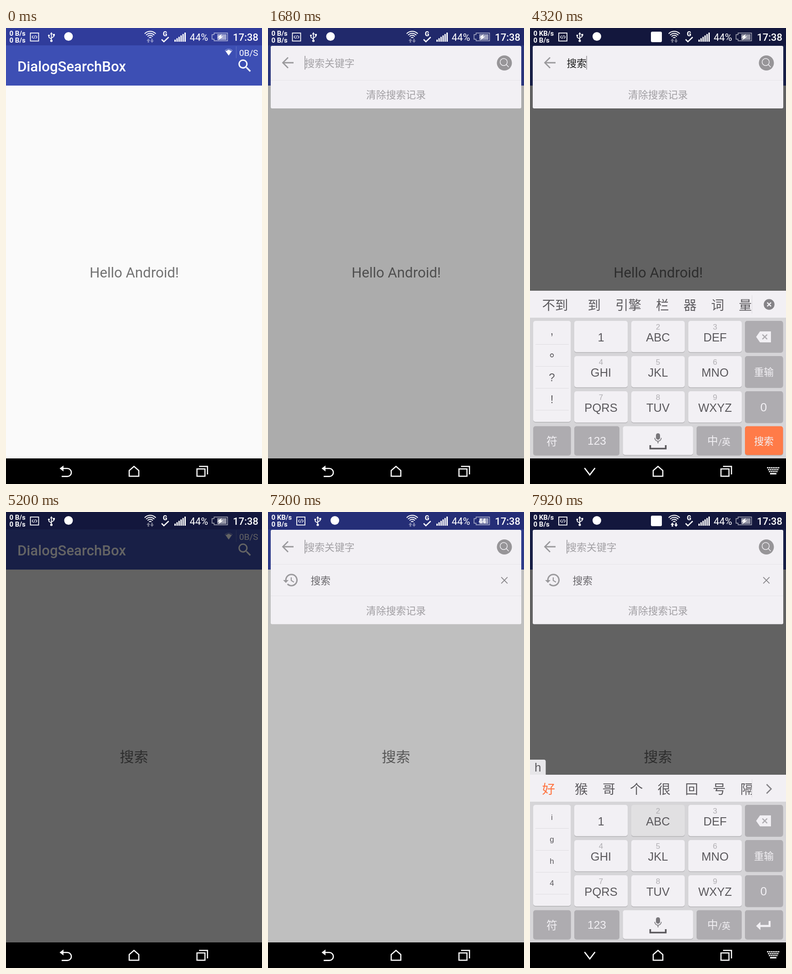
An HTML page with a canvas that plays this animation: 561 by 998 pixels, repeating every 8 s.

```html
<!DOCTYPE html>
<html lang="zh">
<head>
<meta charset="utf-8">
<title>DialogSearchBox</title>
<style>
html, body { margin: 0; width: 100%; height: 100%; overflow: hidden; background: #000; }
canvas { display: block; }
</style>
</head>
<body>
<canvas id="stage" width="561" height="998"></canvas>
<script>
const c = document.getElementById('stage').getContext('2d');
const LOOP = 8000, STEP = 80;
const SANS = 'Roboto, "Noto Sans CJK SC", "Noto Sans CJK", sans-serif';
const KEYS = '"Liberation Sans", "Noto Sans CJK SC", "Noto Sans CJK", sans-serif';
const PAPER = '#f2f0f4', GREY = '#9a999c', ICON = '#858387', KEY_GREY = '#aeacb0';

const SEARCH = new Path2D('M15.5 14h-.79l-.28-.27A6.471 6.471 0 0 0 16 9.5 6.5 6.5 0 1 0 9.5 16c1.61 0 3.09-.59 4.23-1.57l.27.28v.79l5 4.99L20.49 19l-4.99-5zm-6 0C7.01 14 5 11.99 5 9.5S7.01 5 9.5 5 14 7.01 14 9.5 11.99 14 9.5 14z');
const HISTORY = new Path2D('M13 3c-4.97 0-9 4.03-9 9H1l3.89 3.89.07.14L9 12H6c0-3.87 3.13-7 7-7s7 3.13 7 7-3.13 7-7 7c-1.93 0-3.68-.79-4.94-2.06l-1.42 1.42C8.27 19.99 10.51 21 13 21c4.97 0 9-4.03 9-9s-4.03-9-9-9zm-1 5v5l4.28 2.54.72-1.21-3.5-2.08V8H12z');

const PADS = ['1', 'ABC', 'DEF', 'GHI', 'JKL', 'MNO', 'PQRS', 'TUV', 'WXYZ'];

// time of each key press and the digit pressed
const PRESSES = [[2800, 7], [2960, 6], [3120, 8], [3280, 7], [3440, 8], [3600, 6], [7840, 4], [7920, 2]];

// from, spelling, candidates, left column
const COMPOSE = [
  [2800, 's', '是 去 请 上 说 前 却 确', 'sqp7'],
  [2960, 'so', '搜 破 颇 婆 泼 坡 魄 迫', 'srp7'],
  [3120, 'sou', '搜 艘 嗽 叟 飕 擞 嗖 馊', 'srp7'],
  [3280, "sou's", '搜索 搜 艘 嗽 叟 飕 擞', 'srp7'],
  [3440, "sou'su", '搜索 搜 艘 嗽 叟 飕 擞', 'srp7'],
  [3600, "sou'suo", '搜索 搜 艘 嗽 叟 飕 擞', 'srp7'],
  [7840, 'h', '好 猴 哥 个 很 回 号 隔', 'igh4']
];
const PREDICTED = '不到 到 引擎 栏 器 词 量';

const clamp = v => Math.max(0, Math.min(1, v));
const ramp = (t, from, span) => clamp((t - from) / span);
const within = (t, a, b) => t >= a && t < b;
const smooth = v => (1 - Math.cos(Math.PI * v)) / 2;

function text(s, x, y, size, color, align = 'left', weight = 400, family = SANS) {
  c.font = `${weight} ${size}px ${family}`;
  c.textAlign = align;
  c.fillStyle = color;
  c.fillText(s, x, y);
}
function rect(x, y, w, h, color) {
  c.fillStyle = color;
  c.fillRect(x, y, w, h);
}
function round(x, y, w, h, r, color) {
  c.beginPath();
  c.roundRect(x, y, w, h, r);
  c.fillStyle = color;
  c.fill();
}
function disc(x, y, r, color) {
  c.beginPath();
  c.arc(x, y, r, 0, 7);
  c.fillStyle = color;
  c.fill();
}
function trace(pts) {
  c.beginPath();
  for (let i = 0; i < pts.length; i += 2) c.lineTo(pts[i], pts[i + 1]);
}
function line(pts, color, width, closed) {
  trace(pts);
  if (closed) c.closePath();
  c.strokeStyle = color;
  c.lineWidth = width;
  c.stroke();
}
function poly(pts, color) {
  trace(pts);
  c.fillStyle = color;
  c.fill();
}
function cross(x, y, r, color, width) {
  line([x - r, y - r, x + r, y + r], color, width);
  line([x + r, y - r, x - r, y + r], color, width);
}
function icon(path, x, y, scale, color) {
  c.save();
  c.translate(x, y);
  c.scale(scale, scale);
  c.fillStyle = color;
  c.fill(path);
  c.restore();
}

function drawPage(t) {
  rect(0, 0, 561, 998, '#fafafa');
  rect(0, 0, 561, 126, '#3d4fb4');
  rect(0, 0, 561, 38, '#303c9b');
  text('DialogSearchBox', 25, 95, 31.17, '#fff', 'left', 500);
  for (const tap of [1440, 6960]) {
    if (within(t, tap, tap + 160)) disc(523, 82, 18 + (t - tap) / 10, 'rgba(255,255,255,.15)');
  }
  icon(SEARCH, 504.6, 64, 1.558, '#fff');
  c.beginPath();
  c.moveTo(488, 60);
  c.lineTo(480, 49);
  c.quadraticCurveTo(488, 43, 496, 49);
  c.closePath();
  c.strokeStyle = 'rgba(255,255,255,.6)';
  c.lineWidth = 1;
  c.stroke();
  poly([488, 60, 481.5, 50.5, 488, 47.5, 494.5, 50.5], '#fff');
  rect(504, 40, 1, 26, 'rgba(255,255,255,.2)');
  const busy = within(t, 2640, 2800);
  text(busy ? '0.2K/S' : '0B/S', 511, 61, 19, '#fff');
  if (t < 4720) text('Hello Android!', 281, 546, 31.17, '#737373', 'center');
  else text('搜索', 280.5, 547, 31.17, '#737373', 'center');
}

function drawStatus(t, keyboard) {
  const kb = within(t, 1840, 5040) || t >= 7040;
  const dx = kb ? 9.5 : 0, W = '#fff';
  text(kb ? '0 KB/s' : '0 B/s', 7.5, 16.5, 15, W, 'left', 700);
  text('0 B/s', 7.5, 31.5, 15, W, 'left', 700);

  c.save();
  c.translate(dx, 0);
  c.strokeStyle = W;
  c.lineWidth = 1.8;
  c.strokeRect(53.5, 11, 18, 17.5);
  line([60, 16.5, 57, 19.7, 60, 23], W, 1.2);
  line([65, 16.5, 68, 19.7, 65, 23], W, 1.2);
  line([63.6, 16, 61.4, 23.5], W, 1.1);
  line([99.5, 12, 99.5, 27], W, 1.8);
  poly([96.5, 14, 99.5, 9, 102.5, 14], W);
  line([99.5, 24, 94, 20.5, 94, 17], W, 1.6);
  line([99.5, 22, 105, 18.5, 105, 16], W, 1.6);
  disc(94, 16.5, 2, W);
  rect(103, 13, 4, 4, W);
  disc(99.5, 28, 2.6, W);
  disc(137, 18.5, 9.5, W);
  c.restore();

  if (keyboard) round(265, 8, 24, 23, 3, W);

  c.lineWidth = 2;
  c.strokeStyle = W;
  for (let i = 0; i < 4; i++) {
    c.beginPath();
    c.arc(316, 24, 3.5 + i * 4.4, -Math.PI * .76, -Math.PI * .24);
    c.stroke();
  }
  const both = t >= 7920, up = both || within(t, 2640, 2880);
  const idle = 'rgba(255,255,255,.42)';
  poly([312, 23, 316, 28, 313.5, 28, 313.5, 32, 310.5, 32, 310.5, 28, 308, 28], up ? W : idle);
  poly([320, 32.5, 316, 27.5, 318.5, 27.5, 318.5, 23.5, 321.5, 23.5, 321.5, 27.5, 324, 27.5], both ? W : idle);

  text('G', 348.5, 17.5, 14, W, 'center', 900);
  line([341, 25, 346, 30, 356.5, 20], W, 2.6);
  for (let i = 0; i < 6; i++) {
    const h = 4.5 + i * 3.1;
    rect(369 + i * 4.4, 30 - h, 3, h, W);
  }
  text('44%', 402.5, 28, 21.8, W);
  text('17:38', 553, 28, 22, W, 'right', 500);

  const edge = 'rgba(255,255,255,.65)';
  line([456, 11, 485.5, 11, 485.5, 28, 456, 28, 456, 24.5, 451.5, 24.5, 451.5, 14.5, 456, 14.5], edge, 1.4, true);
  const charged = within(t, 5760, 5920) || within(t, 6080, 6320) || within(t, 6560, 6720);
  const left = charged ? 458 : 463;
  rect(left, 13.5, 483 - left, 12.5, 'rgba(255,255,255,.55)');
  if (within(t, 2640, 3040) || within(t, 7120, 7440)) {
    text('44', 469.5, 25, 14, W, 'center', 700);
  } else {
    poly([473, 13, 463, 21, 468, 21, 465, 27, 476, 18.5, 470.5, 18.5], W);
  }
}

function drawNav(keyboard) {
  const W = '#fff';
  rect(0, 942, 561, 56, '#000');
  if (keyboard) {
    line([119.5, 963, 131, 978, 142.5, 963], W, 2.8);
    for (let r = 0; r < 4; r++) {
      const n = 7 - r;
      for (let i = 0; i < n && r < 3; i++) rect(519.5 + r * 2 + i * 4, 961 + r * 4.2, 2.8, 2.8, W);
    }
    rect(526, 974, 14, 3, W);
  } else {
    c.beginPath();
    c.moveTo(122, 964);
    c.lineTo(134.5, 964);
    c.arc(134.5, 972.7, 8.7, -Math.PI / 2, Math.PI / 2);
    c.lineTo(122, 981.4);
    c.strokeStyle = W;
    c.lineWidth = 2.6;
    c.stroke();
    poly([117.5, 964, 126, 957.5, 126, 970.5], W);
  }
  line([280.5, 959.5, 291, 968.5, 291, 981, 270, 981, 270, 968.5], W, 2.5, true);
  line([418.5, 965, 436, 965, 436, 981, 418.5, 981], W, 2.5, true);
  line([423, 959.5, 441.5, 959.5, 441.5, 977], W, 2.5);
}

function drawCard(t, reveal, history, typed, cursor) {
  if (!reveal) return;
  c.save();
  c.beginPath();
  c.arc(523, 82, reveal * 545, 0, 7);
  c.clip();
  round(6, 39, 549, history ? 206.5 : 137, 3, PAPER);
  rect(6, 114, 549, 1, '#e6e4e8');
  line([32.5, 76, 56, 76], GREY, 2.8);
  line([44, 64.5, 32.5, 76, 44, 87.5], GREY, 2.8);
  if (typed) text('搜索', 80.5, 85, 21.8, '#1c1c1c');
  else text('搜索关键字', 80.5, 85, 21.8, '#a3a1a5');
  if (cursor) rect(typed ? 123.5 : 80.5, 61, 1.2, 30, '#77757a');

  disc(518, 76.5, 16.5, '#979598');
  c.beginPath();
  c.arc(516.5, 74.5, 7.8, 0, 7);
  c.strokeStyle = PAPER;
  c.lineWidth = 1.5;
  c.stroke();
  line([522, 80, 527.5, 85.5], PAPER, 1.6);

  if (history) {
    icon(HISTORY, 31.5, 130.7, 1.524, GREY);
    text('搜索', 93.5, 158, 21.8, '#69676b');
    cross(518, 149.5, 6.8, '#88868a', 1.8);
    rect(6, 183, 549, 1, '#e6e4e8');
  }
  text('清除搜索记录', 280.5, history ? 224 : 154, 21.8, '#a09ea2', 'center');
  c.restore();
}

function key(x, y, w, h, color = PAPER) {
  round(x, y + 1.5, w, h, 5, '#b4b3b6');
  round(x, y, w, h, 5, color);
}

function drawTools() {
  c.save();
  c.translate(51, 604);
  c.rotate(-.2);
  round(-14, -13.5, 28, 27, 4, ICON);
  c.restore();

  disc(148, 604, 12.3, ICON);
  disc(152.5, 600.5, 1.8, PAPER);
  line([141, 598.5, 145.5, 601, 141, 603], PAPER, 1.6);
  c.beginPath();
  c.arc(148, 605.5, 6, .1, Math.PI - .1);
  c.fillStyle = PAPER;
  c.fill();

  round(231, 593.5, 27, 21.5, 3, ICON);
  for (let i = 0; i < 8; i++) rect(235 + (i % 4) * 5.3, 598 + (i >> 2) * 5, 3, 2.6, PAPER);
  rect(238, 608.5, 13, 2.4, PAPER);

  line([336, 595, 346, 595], ICON, 2.4);
  line([336, 613, 346, 613], ICON, 2.4);
  line([341, 595, 341, 613], ICON, 2.4);
  poly([328, 604, 333.5, 599.5, 333.5, 608.5], ICON);
  poly([354, 604, 348.5, 599.5, 348.5, 608.5], ICON);

  for (let i = 0; i < 6; i++) {
    c.save();
    c.translate(437.5, 604);
    c.rotate(i * Math.PI / 3 + Math.PI / 6);
    round(-3.8, -12, 7.6, 8, 1.5, ICON);
    c.restore();
  }
  disc(437.5, 604, 9.3, ICON);
  disc(437.5, 604, 3.8, PAPER);
  poly([514, 599, 533.5, 599, 524, 611], ICON);
}

function drawCandidates(list, lead) {
  c.save();
  c.beginPath();
  c.rect(0, 575, 487, 59);
  c.clip();
  let x = 26.5;
  list.split(' ').forEach((word, i) => {
    text(word, x, 616.5, 28.5, i || !lead ? '#5c5a5e' : '#ff7340');
    x += word.length * 28.5 + (i ? 32 : 43);
  });
  c.restore();
}

function drawKeyboard(t, show, comp, predicted) {
  if (!show) return;
  const ink = '#5b595d', W = PAPER;
  c.save();
  c.beginPath();
  c.rect(0, 0, 561, 942);
  c.clip();
  c.globalAlpha = show;
  c.translate(0, (1 - show) * 75);
  rect(0, 575, 561, 367, '#d6d5d8');
  rect(0, 575, 561, 59, PAPER);

  if (comp) {
    c.font = `26px ${KEYS}`;
    const w = c.measureText(comp[1]).width + 20;
    round(0, 542, w, 33, [0, 4, 0, 0], '#e7e6e9');
    text(comp[1], w / 2, 568, 26, ink, 'center', 400, KEYS);
    drawCandidates(comp[2], true);
    line([518.5, 596, 528.5, 606, 518.5, 616], ICON, 2.6);
  } else if (predicted) {
    drawCandidates(PREDICTED, false);
    disc(524, 605, 11.8, ICON);
    cross(524, 605, 4.2, PAPER, 2.6);
  } else {
    drawTools();
  }
  rect(486, 585, 1, 40, '#dddbdf');

  key(7, 641, 82.5, 221);
  for (let i = 0; i < 4; i++) rect(12, 692 + i * 48, 73, 1, '#dfdde1');
  if (comp) {
    [...comp[3]].forEach((s, i) => text(s, 48, 674 + i * 48, 17, ink, 'center', 400, KEYS));
  } else {
    text(',', 48, 671, 25, ink, 'center', 400, KEYS);
    c.beginPath();
    c.arc(48, 716.5, 3.4, 0, 7);
    c.strokeStyle = ink;
    c.lineWidth = 1.6;
    c.stroke();
    text('?', 48, 773, 24, ink, 'center', 400, KEYS);
    text('!', 48, 821, 24, ink, 'center', 400, KEYS);
  }

  const press = PRESSES.find(p => within(t, p[0], p[0] + STEP));
  PADS.forEach((label, i) => {
    const x = 97 + (i % 3) * 125, y = 641 + Math.floor(i / 3) * 77;
    const down = press && press[1] === i + 1;
    key(x, y, 117, 68.5, down ? '#e1e0e2' : PAPER);
    if (i) text(i + 1, x + 58.5, y + 19, 17, '#b0aeb2', 'center', 400, KEYS);
    text(label, x + 58.5, y + 44.5, 25.5, ink, 'center', 400, KEYS);
  });

  for (let i = 0; i < 3; i++) key(471, 641 + i * 77, 83.5, 68.5, KEY_GREY);
  poly([495.5, 676, 504, 664, 528, 664, 528, 688, 504, 688], W);
  cross(514.5, 676, 5.2, KEY_GREY, 2.4);
  text('重输', 512.5, 760.5, 21.5, W, 'center');
  text('0', 512, 839, 26, W, 'center', 400, KEYS);

  key(7, 871.5, 82.5, 63, KEY_GREY);
  key(97, 871.5, 99, 63, KEY_GREY);
  key(203.5, 871.5, 154, 63);
  key(365, 871.5, 99, 63, KEY_GREY);
  key(471, 871.5, 83.5, 63, comp ? KEY_GREY : '#ff7b48');
  text('符', 48, 912.5, 24, W, 'center');
  text('123', 146.5, 912, 24.5, W, 'center', 400, KEYS);
  text('中', 388.5, 912, 23.5, W);
  text('/英', 412.5, 912.5, 19, W);

  round(276, 887, 9, 14, 4.5, '#79777b');
  c.beginPath();
  c.arc(280.5, 897, 7.2, 0, Math.PI);
  c.strokeStyle = '#79777b';
  c.lineWidth = 1.6;
  c.stroke();
  line([280.5, 904, 280.5, 909], '#79777b', 2);
  line([263.5, 913, 263.5, 920.5, 297.5, 920.5, 297.5, 913], ink, 3.6);

  if (comp) {
    poly([495.5, 906, 505, 897, 505, 915], W);
    line([503, 906, 525, 906, 525, 895], W, 4.4);
  } else {
    text('搜索', 512.5, 911.5, 21.5, W, 'center');
  }
  c.restore();
}

function draw(t) {
  const second = t >= 6000;
  const dim = ramp(t, 1594, 166) - ramp(t, 5200, 176) + ramp(t, 7136, 166);
  const reveal = smooth(ramp(t, 1520, 140)) - smooth(ramp(t, 5040, 160)) + smooth(ramp(t, 7050, 140));
  const slide = (from, span) => 1 - (1 - ramp(t, from, span)) ** 3;
  const show = slide(1740, 240) - slide(4800, 160) + slide(7280, 240);
  const keyboard = show > 0;
  const typed = within(t, 4160, 6000);
  const blinkFrom = second ? (t < 7480 ? 7050 : 7480) : typed ? 4160 : t < 2000 ? 1520 : 2000;
  const cursor = (t - blinkFrom) % 1000 < 500;
  const comp = within(t, 2800, 4160) || t >= 7840
    ? COMPOSE.filter(s => s[0] <= t).pop() : null;

  drawPage(t);
  if (dim > 0) rect(0, 0, 561, 998, `rgba(0,0,0,${dim * .607})`);
  drawStatus(t, keyboard);
  drawCard(t, reveal, second, typed, cursor);
  drawKeyboard(t, show, comp, typed);
  drawNav(keyboard);
}

function frame() {
  const t = performance.now() % LOOP;
  draw(Math.floor(t / STEP) * STEP);
  requestAnimationFrame(frame);
}
frame();
</script>
</body>
</html>
```
